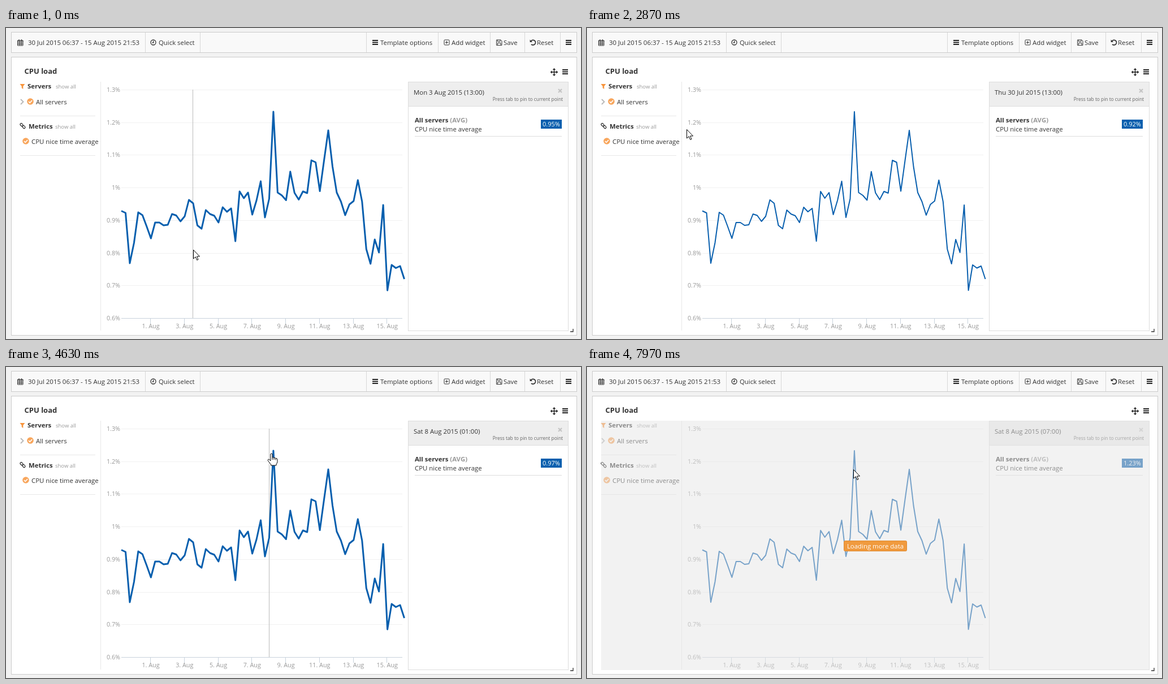
An HTML page for the animation above (8 s loop, 1017 by 550 pixels).

```html
<!DOCTYPE html>
<html lang="en">
<head>
<meta charset="utf-8">
<title>CPU load</title>
<style>
html, body { margin: 0; width: 100%; height: 100%; overflow: hidden; background: #f2f2f2; }
svg { display: block; width: 1017px; height: 550px; font: 11.4px "Open Sans", sans-serif; }
text { fill: #333; white-space: pre; }
.bold { font-weight: 700; }
.small { font-size: 9.5px; fill: #999; }
.tiny { font-size: 9.3px; fill: #555; }
.axis text { font-size: 10.8px; fill: #999; }
.white { fill: #fff; }
.rule { stroke: #e8e8e8; fill: none; }
.edge { stroke: #ccc; fill: none; }
.icon { stroke: #333; fill: none; stroke-width: 1.3; }
.button { fill: #f9f9f9; stroke: #ddd; }
.hover text { font-weight: 700; }
.hover circle { fill: #f79a45; }
.cursor path { fill: #fff; stroke: #000; stroke-linejoin: round; }
</style>
</head>
<body>
<svg viewBox="0 0 1017 550">
  <defs>
    <clipPath id="sideClip"><path d="M10 95H167V535H10Z"/></clipPath>
    <filter id="shadow" x="-10%" y="-10%" width="120%" height="125%">
      <feDropShadow dx="0" dy="1" stdDeviation="2" flood-opacity=".35"/>
    </filter>
    <g id="check">
      <circle r="5.8" fill="#f8a65c"/>
      <path d="M-3 0L-.8 2.3 3.2-2" fill="none" stroke="#fff" stroke-width="1.7"/>
    </g>
    <path id="menu" d="M0 1H10M0 4.5H10M0 8H10" stroke="#222" stroke-width="1.8"/>
  </defs>

  <!-- Toolbar -->
  <rect x="9.5" y="7.5" width="1000" height="36" fill="#f9f9f9" stroke="#ccc"/>
  <path class="edge" stroke-opacity=".75" d="M246.5 8V43M343.5 8V43M637.5 8V43M764.5 8V43M856.5 8V43M917.5 8V43M980.5 8V43"/>
  <g class="icon">
    <path d="M20.5 22H30V31H20.5ZM20 23.2H30.5M23 20V23M27.5 20V23M21 26H30M21 28.5H30M23.8 23V31M27 23V31" stroke-width="1"/>
    <circle cx="260.5" cy="25.5" r="4.5"/><path d="M260.8 22.8V26H258.5"/>
    <rect x="775" y="21" width="9" height="9" rx="1.2" stroke-width="1"/><path d="M779.5 23V28M777 25.5H782" stroke-width="1"/>
    <path d="M867.5 21H875L877 23V30.5H867.5ZM869.5 21V24H874V21M869.5 30V26.5H875V30" stroke-width="1"/>
    <path d="M928.5 23.2A4.4 4.4 0 1 1 929 28.8" stroke-width="1.7"/><path d="M926.6 20.5V25H931Z" fill="#333" stroke="none"/>
  </g>
  <use href="#menu" x="648" y="21"/><use href="#menu" x="990" y="21"/>
  <text x="39" y="30">30 Jul 2015 06:37 - 15 Aug 2015 21:53</text>
  <text x="270" y="30">Quick select</text>
  <text x="662" y="30">Template options</text>
  <text x="788" y="30">Add widget</text>
  <text x="880" y="30">Save</text>
  <text x="939" y="30">Reset</text>

  <!-- Widget -->
  <rect x="9.5" y="51.5" width="1000" height="492" fill="#fff" stroke="#ccc"/>
  <text x="32.5" y="81" class="bold" font-size="13">CPU load</text>
  <path d="M969.5 72V84M963.5 78H975.5" stroke="#222" stroke-width="1.5"/>
  <path d="M969.5 71l2.7 3h-5.4ZM969.5 85l2.7-3h-5.4ZM962.8 78l3-2.7v5.4ZM976.2 78l-3-2.7v5.4Z" fill="#222"/>
  <use href="#menu" x="984" y="73"/>
  <path d="M1003 532V537H998" class="icon" stroke="#666"/>

  <!-- Filters -->
  <path class="rule" d="M167.5 95V535M25 155.5H158M25 225.5H158"/>
  <path d="M24.5 99H33.5L30.3 103V108L27.7 106V103Z" fill="#f7943c"/>
  <text x="38" y="107" class="bold">Servers</text><text x="88" y="107" class="small">show all</text>
  <path d="M26 126L30.5 130.5 26 135" fill="none" stroke="#bbb" stroke-width="2"/>
  <g id="serverRow"><use href="#check" x="43" y="130"/><text x="53" y="134.5">All servers</text></g>
  <g class="icon"><rect x="25" y="169.5" width="5.4" height="3.8" rx="1.8" transform="rotate(45 28 171)"/><rect x="29" y="173.5" width="5.4" height="3.8" rx="1.8" transform="rotate(45 32 175)"/></g>
  <text x="40" y="177.5" class="bold">Metrics</text><text x="87" y="177.5" class="small">show all</text>
  <g clip-path="url(#sideClip)"><g id="metricRow"><use href="#check" x="35" y="200"/><text x="45" y="204.5">CPU nice time average</text></g></g>

  <!-- Chart -->
  <g id="axes" class="axis"></g>
  <path id="crosshair" stroke="#bbb"/>
  <polyline id="series" fill="none" stroke="#085fae" stroke-linejoin="round"/>

  <!-- Readout -->
  <rect x="711.5" y="95.5" width="283" height="440" fill="#fff" stroke="#ddd"/>
  <rect x="711.5" y="95.5" width="283" height="43" fill="#eee" stroke="#ddd"/>
  <text id="date" x="721" y="117.5"></text>
  <path d="M977 108L983 114M983 108L977 114" stroke="#c4c4c4" stroke-width="2.2"/>
  <text x="985" y="129" text-anchor="end" font-size="8.4" style="fill:#666">Press tab to pin to current point</text>
  <text x="723" y="167" class="bold">All servers <tspan fill="#999">(AVG)</tspan></text>
  <text x="723" y="183">CPU nice time average</text>
  <rect x="946" y="162" width="37" height="16" fill="#085fae"/>
  <text id="value" x="964.5" y="174" text-anchor="middle" font-size="11" class="white"></text>
  <path d="M723 191.5H983" stroke="#ddd"/>

  <!-- Point details -->
  <g id="tooltip">
    <rect x="398.5" y="114.5" width="143" height="89" rx="2" fill="#fff" stroke="#085fae" filter="url(#shadow)"/>
    <path d="M398 116Q398 114 400 114H540Q542 114 542 116V158H398Z" fill="#085fae"/>
    <text x="404.5" y="136" class="bold white" font-size="15">1.23</text>
    <text x="405" y="151" class="white" font-size="9.5">%</text>
    <text x="535" y="131" text-anchor="end" class="white" font-size="9.7" font-weight="600">Sat 8 Aug (07:00)</text>
    <text x="404.5" y="173.5" class="tiny">Expand:</text>
    <rect x="482.5" y="163.5" width="52" height="15" rx="1.5" class="button"/>
    <text id="expand" x="485.5" y="174.5" class="tiny">All servers</text>
    <rect x="404.5" y="184.5" width="52" height="15" rx="1.5" class="button"/>
    <text x="408.5" y="195.5" class="tiny">Add Event</text>
  </g>

  <g id="loading">
    <rect x="25" y="95" width="970" height="441" fill="#e5e5e5" fill-opacity=".5"/>
    <rect x="454.5" y="307.5" width="111" height="18" rx="2" fill="#f09a3e" stroke="#df8a30"/>
    <text x="510" y="320.5" text-anchor="middle" class="white">Loading more data</text>
  </g>

  <g id="cursor" class="cursor">
    <path id="arrow" d="M0 0V15.5L3.7 12.3 6.2 18 8.5 17 6 11.5H11Z"/>
    <g id="hand">
      <path d="M-1.6 1.5Q0-1 1.6 1.5V8Q3.2 6.3 4.6 8.2 6.3 7 7.6 9.2 9.8 8.3 10.5 10.7V15Q10 18 8.5 19.5V21.5H-1V19.5Q-4 16.5-6.3 12.8-6.3 9.8-3.7 11.2L-1.6 13.5Z"/>
      <path d="M1.6 8V11.5M4.6 8.2V11.5M7.6 9.2V12" style="fill:none"/>
    </g>
  </g>
</svg>
<script>
const LOOP = 8000, CLICK = 5730, EXPAND = 7600, LAG = 90;
const LEFT = 204, STEP = 7.47, BOTTOM = 513;
const $ = id => document.getElementById(id);
const show = (id, on) => $(id).style.display = on ? "" : "none";

// One height per six hours, in stage pixels.
const heights = [
  323.5, 327, 416, 380, 326, 331, 351, 372, 344, 344, 349, 348, 329, 331.5, 342, 333, 304,
  310, 349, 355, 322, 329, 332, 344, 317, 325, 319, 377, 289, 301, 291, 330, 305, 271,
  335, 302, 148, 291, 296, 304.5, 254, 291.5, 303.5, 289, 292, 234, 237.5, 288.5, 234, 181, 245,
  291, 307, 331, 312, 306, 269, 307, 391, 417, 374, 397, 313, 464, 419, 424.5, 421, 444];

// Pointer path: time, x, y.
const route = [
  [0, 331, 392], [150, 331, 392], [400, 255, 330], [600, 190, 270], [970, 80, 202],
  [1030, 80, 202], [1200, 100, 160], [1400, 95, 133], [1600, 70, 130], [1870, 70, 135],
  [2170, 92, 134], [2630, 88, 138], [2700, 95, 142], [2900, 190, 185], [3240, 338, 262],
  [3330, 361, 274], [3470, 364, 276], [3530, 364, 276], [3900, 420, 205], [4300, 455, 158],
  [4370, 455, 158], [4630, 469, 152], [4930, 469, 152], [5030, 469, 151], [5170, 469, 151],
  [5300, 471, 150], [5440, 471, 150], [5470, 473, 148], [6000, 473, 148], [6350, 456, 164],
  [6770, 475, 167], [6830, 475, 167], [7170, 491, 169], [7800, 491, 169], [7970, 471, 181], [LOOP, 471, 181]];

function pointerAt(t) {
  const i = Math.max(1, route.findIndex(p => p[0] >= t));
  const [t0, x0, y0] = route[i - 1], [t1, x1, y1] = route[i];
  const k = (t - t0) / (t1 - t0);
  return { x: x0 + (x1 - x0) * k, y: y0 + (y1 - y0) * k };
}

function formatDate(index) {
  const d = new Date(Date.UTC(2015, 6, 30, 7 + index * 6));
  const day = ["Sun", "Mon", "Tue", "Wed", "Thu", "Fri", "Sat"][d.getUTCDay()];
  const month = d.getUTCMonth() === 6 ? "Jul" : "Aug";
  return `${day} ${d.getUTCDate()} ${month} 2015 (${String(d.getUTCHours()).padStart(2, "0")}:00)`;
}

function buildChart() {
  let axes = "";
  for (let i = 0; i < 8; i++) {
    const y = Math.round(BOTTOM - i * 57.75) + .5, x = 255.5 + i * 59.75;
    axes += `<path d="M204 ${y}H701" stroke="${i ? "#f1f1f1" : "#c8d2dc"}"/>
      <text x="202" y="${y + 3}" text-anchor="end">${+(0.6 + i / 10).toFixed(1)}%</text>
      <path d="M${Math.floor(x) + .5} 513V523" stroke="#c8d2dc"/>
      <text x="${x + .5}" y="531" text-anchor="middle">${1 + 2 * i}. Aug</text>`;
  }
  $("axes").innerHTML = axes;
  $("series").setAttribute("points", heights.map((y, i) => `${LEFT + i * STEP},${y}`).join(" "));
}

function draw(t) {
  const { x, y } = pointerAt(t);
  const sampled = pointerAt(Math.max(0, Math.min(t, CLICK) - LAG));
  const index = Math.max(1, Math.round((sampled.x - LEFT) / STEP));
  const tracking = sampled.x >= LEFT && t < CLICK;
  const onServer = x < 115 && y > 121 && y < 140;
  const onMetric = x < 167 && y > 191 && y < 210;
  const onExpand = x > 482 && t > 6830 && t < EXPAND;
  const onPeak = t > 4500 && t < CLICK;
  const hand = onServer || onMetric || onExpand || onPeak;

  $("date").textContent = formatDate(index);
  $("value").textContent = (0.6 + (BOTTOM - heights[index]) / 577).toFixed(2) + "%";
  $("series").setAttribute("stroke-width", tracking ? 3 : 2);
  $("crosshair").setAttribute("d", `M${Math.floor(LEFT + index * STEP) + .5} 109V513`);
  show("crosshair", tracking);
  $("serverRow").classList.toggle("hover", onServer);
  $("metricRow").classList.toggle("hover", onMetric);
  $("expand").style.fill = onExpand ? "#000" : "";
  show("tooltip", t >= CLICK && t < EXPAND);
  show("loading", t >= EXPAND);
  $("loading").setAttribute("opacity", t < EXPAND + 30 ? .5 : 1);
  $("cursor").setAttribute("transform", `translate(${Math.round(x) + .5} ${Math.round(y) + .5})`);
  show("arrow", !hand);
  show("hand", hand);
}

buildChart();
const start = performance.now();
function tick() {
  draw((performance.now() - start) % LOOP);
  requestAnimationFrame(tick);
}
tick();
</script>
</body>
</html>
```
